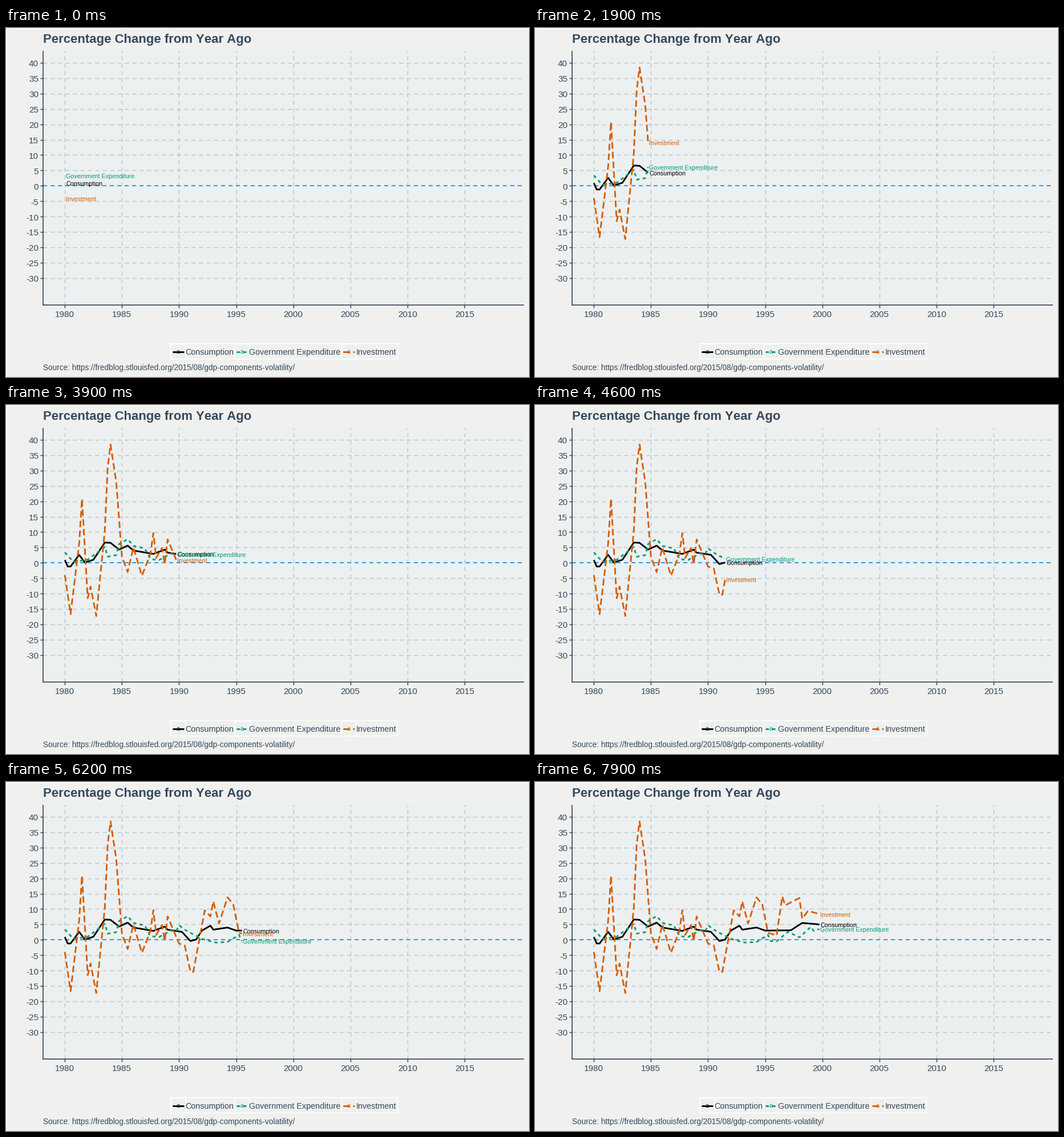
Recreate the animation shown at these times as a matplotlib script. Size 917 by 611 pixels, loop 8 s.

```python
import matplotlib.pyplot as plt
import numpy as np
from matplotlib.animation import FuncAnimation
from matplotlib.patches import Rectangle

W, H, DPI = 917, 611, 64
PT = 72 / DPI  # points per pixel
COUNT = 80     # quarters, one per step

PAPER, PANEL = "#f0f0ee", "#ecf0f1"
GRID, INK, AXIS, ZERO = "#bdc3c7", "#34495e", "#2c3e50", "#3498db"
LEFT, RIGHT, TOP, BOTTOM = 65, 908, 40, 485
LINE, THIN = 2.85, 1.42

plt.rcParams["text.kerning_factor"] = 6  # plain advance widths, no kerning

# Turning points of each series: (quarter since 1980, percent change)
consumption = [
    (0, 0.9), (1, -1.2), (2, -1.2), (5, 2.6), (7, 0.1), (10, 1),
    (14, 6.6), (16, 6.5), (19, 4.3), (22, 5.6), (24, 4), (31, 2.9),
    (35, 4.3), (36, 3.3), (41, 2.6), (44, -0.4), (46, 0.1), (48, 3),
    (51, 4.6), (52, 3.3), (57, 4), (60, 3), (69, 3.1), (73, 5.5), (79, 5),
]
government = [
    (0, 3.4), (3, 0.3), (8, 1), (14, 5.2), (15, 2), (18, 2.5),
    (19, 6.1), (22, 7.7), (24, 5.5), (28, 4.7), (30, 1.2), (33, 0.9),
    (37, 3), (39, 2.8), (40, 4.7), (43, 2.7), (49, 0), (53, -0.9),
    (57, -0.7), (61, 1.6), (62, -0.4), (64, -0.5), (68, 2.6), (72, 0.8),
    (76, 4.2), (77, 2.9), (79, 3.5),
]
investment = [
    (0, -4), (2, -16.7), (5, 6.2), (6, 20.8), (8, -11.5), (9, -7.7),
    (11, -17.3), (14, 10.5), (15, 31), (16, 38.5), (18, 26.2), (20, 2),
    (22, -3), (24, 5), (27, -4.2), (30, 3), (31, 9.7), (32, 1.6),
    (34, 4.8), (35, -0.4), (36, 7.6), (40, -1.2), (42, -1.8), (44, -10.4),
    (45, -10.4), (49, 9.6), (51, 7.6), (52, 12.5), (54, 5.3), (57, 13.8),
    (59, 11.5), (61, 2.3), (64, 1.4), (66, 14.1), (67, 11.2), (72, 13.6),
    (73, 6.9), (75, 9.4), (79, 8.4),
]
SERIES = [
    ("Consumption", consumption, "black", "-"),
    ("Government Expenditure", government, "#009e73", (0, (2, 2))),
    ("Investment", investment, "#d55e00", (0, (4, 2))),
]

fig = plt.figure(figsize=(W / DPI, H / DPI), dpi=DPI, facecolor=PAPER)
ax = fig.add_axes([0, 0, 1, 1])
ax.set(xlim=(0, W), ylim=(H, 0))
ax.axis("off")


def px(year):
    return 103.2 + (year - 1980) * 20.02


def py(value):
    return 276.3 - value * 5.386


def text(x, y, s, size, color=INK, **kw):
    return ax.text(x, y, s, fontsize=size * PT, color=color,
                   family="Liberation Sans", va="baseline", **kw)


def line(xs, ys, color, width=THIN, style="-", **kw):
    return ax.plot(xs, ys, color=color, lw=width * PT, ls=style,
                   solid_capstyle="butt", dash_capstyle="butt",
                   solid_joinstyle="round", dash_joinstyle="round", **kw)[0]


def dashed(xs, ys, color, width=THIN):
    return line(xs, ys, color, width, (0, (7 / width, 6 / width)))


def box(x0, y0, x1, y1, fill, edge="none", width=1.4):
    ax.add_patch(Rectangle((x0, y0), x1 - x0, y1 - y0, facecolor=fill,
                           edgecolor=edge, lw=width * PT, zorder=1))


# Panel, grid and axes
box(0.5, 0.5, W - 0.5, H - 0.5, PAPER, "white", 1)
box(LEFT, TOP, RIGHT, BOTTOM, PANEL)
for v in range(-30, 41, 5):
    y = py(v)
    dashed([LEFT, RIGHT], [y, y], GRID)
    line([LEFT - 5, LEFT], [y, y], AXIS)
    text(57, y + 6.4, str(v), 15.2, ha="right")
for year in range(1980, 2016, 5):
    x = px(year)
    dashed([x, x], [BOTTOM, TOP], GRID)
    line([x, x], [BOTTOM, BOTTOM + 5], AXIS)
    text(x, 506, str(year), 15.2, ha="center")
dashed([LEFT, RIGHT], [py(0), py(0)], ZERO, 1.9)
line([LEFT, LEFT], [TOP, BOTTOM + 0.7], AXIS, 1.6)
line([LEFT, RIGHT], [BOTTOM, BOTTOM], AXIS, 1.6)

text(65, 26, "Percentage Change from Year Ago", 22.15, weight="bold")
text(65, 598.5, "Source: https://fredblog.stlouisfed.org/2015/08/"
     "gdp-components-volatility/", 13.66)

# Legend
box(288, 552, 685.5, 579, PAPER, "white")
for (name, _, color, style), x in zip(SERIES, (289, 401, 588)):
    box(x, 553, x + 26, 578.5, PANEL, "white")
    line([x + 2.6, x + 23.4], [566.5, 566.5], color, LINE, style)
    text(x + 13, 570.5, "a", 10.8, color, ha="center")
    text(x + 25.3, 572, name, 14.35)

# Moving parts
quarters = np.arange(COUNT)
xs = px(1980 + quarters / 4)
tracks = []
for name, points, color, style in SERIES:
    ys = py(np.interp(quarters, *zip(*points)))
    curve = line([], [], color, LINE, style, zorder=3)
    tag = text(0, 0, name, 10.8, color, zorder=4)
    tracks.append((curve, tag, ys))


def update(i):
    for curve, tag, ys in tracks:
        curve.set_data(xs[:i + 1], ys[:i + 1])
        tag.set_position((xs[i] + 1.9, ys[i] + 4.7))
    return [artist for track in tracks for artist in track[:2]]


anim = FuncAnimation(fig, update, frames=COUNT, interval=100,
                     repeat=True, repeat_delay=0)
plt.show()
```
